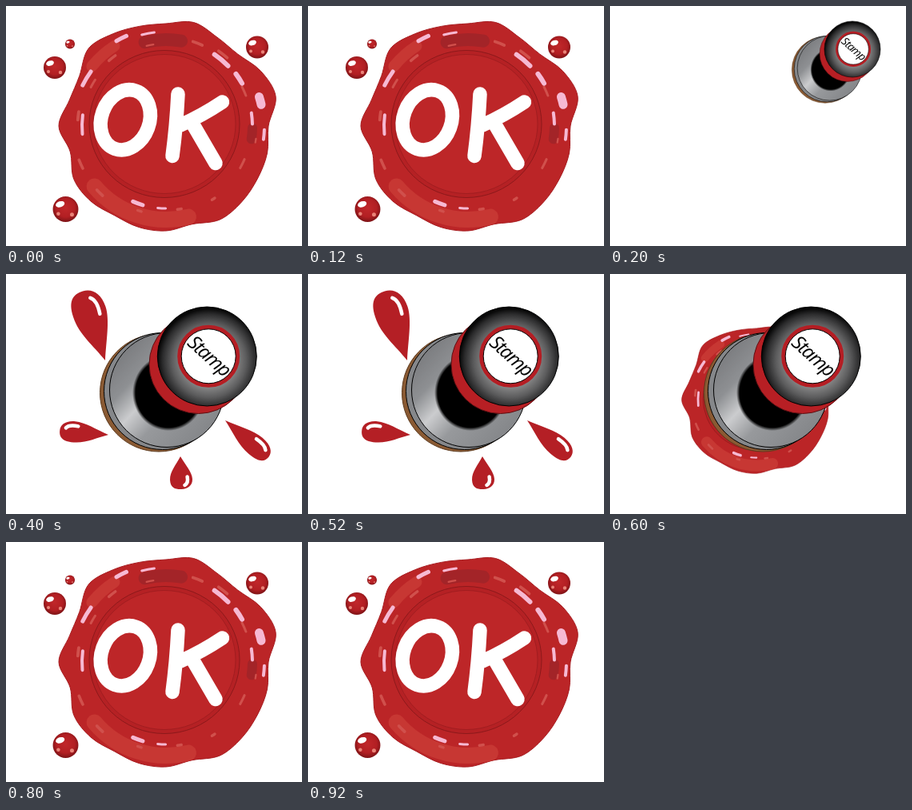
An HTML page for the animation above (1000 ms loop, 370 by 300 pixels).

```html
<!DOCTYPE html>
<html lang="en">
<head>
<meta charset="utf-8">
<title>OK stamp</title>
<style>
html, body { margin: 0; height: 100%; overflow: hidden; background: #fff; }
svg { display: block; width: 100%; height: 100%; }
.label { font: italic 24px "Open Sans", "Noto Sans", sans-serif; letter-spacing: -1.2px; }
#shine { fill: none; stroke-linecap: round; }
</style>
</head>
<body>
<svg viewBox="0 0 370 300">
  <defs>
    <radialGradient id="knob" cx=".52" cy=".54" r=".52">
      <stop offset=".5" stop-color="#8a8a8a"/>
      <stop offset=".72" stop-color="#5c5c5d"/>
      <stop offset=".9" stop-color="#2b2b2c"/>
      <stop offset="1" stop-color="#080808"/>
    </radialGradient>
    <radialGradient id="neck">
      <stop offset=".91"/>
      <stop offset="1" stop-opacity="0"/>
    </radialGradient>
    <linearGradient id="steel" x1="0" y1=".2" x2=".85" y2="1">
      <stop offset="0" stop-color="#77787b"/>
      <stop offset=".25" stop-color="#8e9093"/>
      <stop offset=".42" stop-color="#cbccce"/>
      <stop offset=".6" stop-color="#97999c"/>
      <stop offset="1" stop-color="#808285"/>
    </linearGradient>
    <radialGradient id="glass" cx=".5" cy=".45" r=".55">
      <stop offset="0" stop-color="#c0272a"/>
      <stop offset=".65" stop-color="#b21f23"/>
      <stop offset="1" stop-color="#7d1316"/>
    </radialGradient>

    <g id="stamp" stroke="#000">
      <circle cx="191" cy="148.5" r="73.5" fill="#8a5a33" stroke="#5c3a1e"/>
      <circle cx="195.5" cy="146.5" r="73" fill="#85878a"/>
      <circle cx="201" cy="145" r="71.5" fill="url(#steel)"/>
      <ellipse cx="203" cy="148.5" rx="45" ry="47.5" fill="url(#neck)" stroke="none"/>
      <circle cx="240.5" cy="113" r="61.5" fill="#b71f24" stroke="#5d1013"/>
      <circle cx="251.3" cy="103" r="62" fill="url(#knob)"/>
      <circle cx="253.2" cy="102.8" r="36.5" fill="#fff" stroke="#b51d23" stroke-width="5"/>
      <circle cx="253.2" cy="102.8" r="34" fill="none"/>
      <text class="label" stroke="none" text-anchor="middle" transform="translate(248.5 108.5) rotate(42)">Stamp</text>
    </g>

    <g id="wax">
      <path id="edge" fill="#bb2527" stroke="#a71c20"/>
      <g id="shine"></g>
      <ellipse cx="198" cy="147.5" rx="94" ry="92" fill="#b52124" stroke="#8c191b"/>
      <ellipse cx="198" cy="147.5" rx="89" ry="87" fill="#bd2628" stroke="#a11d20"/>
    </g>

    <g id="bead">
      <circle r="14" fill="url(#glass)"/>
      <ellipse cx="-4" cy="-7" rx="5" ry="3.2" fill="#fff" transform="rotate(-18)"/>
      <circle cx="-8" cy="5" r="2" fill="#e98378"/>
      <circle cx="7" cy="6" r="2.2" fill="#e98378"/>
    </g>

    <!-- Tip at the origin, 100 long -->
    <g id="drop">
      <path fill="#b41f25" d="M0 0C25 -8 45 -20 70 -20S100 -11 100 0S90 20 70 20S25 8 0 0"/>
      <path fill="none" stroke="#fff" stroke-width="4.5" stroke-linecap="round" vector-effect="non-scaling-stroke" d="M63 11Q82 13 88 6"/>
    </g>
  </defs>

  <g id="seal">
    <use href="#wax"/>
    <g role="img" aria-label="OK" fill="none" stroke="#fff" stroke-width="17.5" stroke-linecap="round" stroke-linejoin="round">
      <ellipse cx="149.3" cy="142.3" rx="30" ry="38.5" transform="rotate(20 149.3 142.3)"/>
      <path d="M215 110Q213 150 208 187.5M270.5 120Q245 137 218 149M232 145L262 196.5"/>
    </g>
    <use href="#bead" x="61" y="77"/>
    <use href="#bead" x="314" y="51.5"/>
    <use href="#bead" transform="translate(74.5 254) scale(1.14)"/>
    <use href="#bead" transform="translate(80 47.5) scale(.43)"/>
  </g>

  <g id="lift">
    <use href="#stamp" transform="translate(161 -4.2) scale(.565)"/>
  </g>

  <g id="splash">
    <use href="#drop" transform="translate(124 108) rotate(-108) scale(.91 1.06)"/>
    <use href="#drop" transform="translate(128 201) rotate(185) scale(.61 .66)"/>
    <use href="#drop" transform="translate(218 228) rotate(88) scale(.41 -.7)"/>
    <use href="#drop" transform="translate(274 183) rotate(40) scale(.71 -.66)"/>
    <use href="#stamp"/>
  </g>

  <g id="press">
    <use href="#wax" transform="translate(43.5 52.5) scale(.7)"/>
    <use href="#stamp"/>
  </g>
</svg>
<script>
const $ = id => document.getElementById(id);
const rand = n => Math.abs(Math.sin(n * 12.9898) * 43758.5453) % 1;

// Point around the middle of the wax, clockwise from the right
const polar = (deg, r) => {
  const a = deg * Math.PI / 180;
  return [200 + r * Math.cos(a), 150 + r * Math.sin(a)];
};

// Smooth closed curve through the given points
function closed(pts) {
  const at = i => pts[(i + pts.length) % pts.length];
  const handle = (i, side) => at(i).map((v, k) => v + side * (at(i + 1)[k] - at(i - 1)[k]) / 6);
  return 'M' + at(0) + pts.map((_, i) => `C${handle(i, 1)} ${handle(i + 1, -1)} ${at(i + 1)}`).join('') + 'Z';
}

// Streak that follows the rim, centred on an angle
function streak(color, deg, r, length, width) {
  const half = length / r * 90 / Math.PI;
  const path = document.createElementNS('http://www.w3.org/2000/svg', 'path');
  path.setAttribute('d', `M${polar(deg - half, r)}A${r} ${r} 0 0 1 ${polar(deg + half, r)}`);
  path.setAttribute('stroke', color);
  path.setAttribute('stroke-width', width);
  $('shine').append(path);
}

// Rim radius every 15 degrees
const rim = [128, 131, 132, 134, 135, 127, 131, 131, 129, 133, 133, 124,
  134, 125, 125, 137, 133, 129, 128, 134, 128, 127, 137, 142];
$('edge').setAttribute('d', closed(rim.map((r, i) => polar(i * 15, r))));

streak('#c73733', 108, 117, 130, 20);
streak('#c73733', 228, 119, 38, 14);
streak('#a32428', 268, 108, 46, 16);
streak('#a32428', 5, 108, 14, 12);
for (let i = 0; i < 14; i++) {
  streak('#d0504c', i * 25.7 + 10 * rand(i + 1), 102 + 16 * rand(i + 31), 4 + 10 * rand(i + 61), 2 + 2 * rand(i + 91));
}

// Bright glints: angle, radius, length, width
[
  [181, 105, 24, 4], [211, 116, 20, 5], [243, 123, 14, 5], [259, 118, 16, 3],
  [310, 108, 22, 6], [327, 109, 14, 6], [345, 122, 10, 11], [355, 108, 14, 4],
  [5, 123, 12, 4], [93, 103, 10, 3], [110, 103, 13, 5]
].forEach(glint => streak('#f6b9d3', ...glint));

const scenes = ['seal', 'lift', 'splash', 'press', 'seal'];

function draw() {
  const now = scenes[Math.floor(performance.now() % 1000 / 200)];
  for (const id of new Set(scenes)) $(id).style.display = id === now ? '' : 'none';
  requestAnimationFrame(draw);
}
draw();
</script>
</body>
</html>
```
